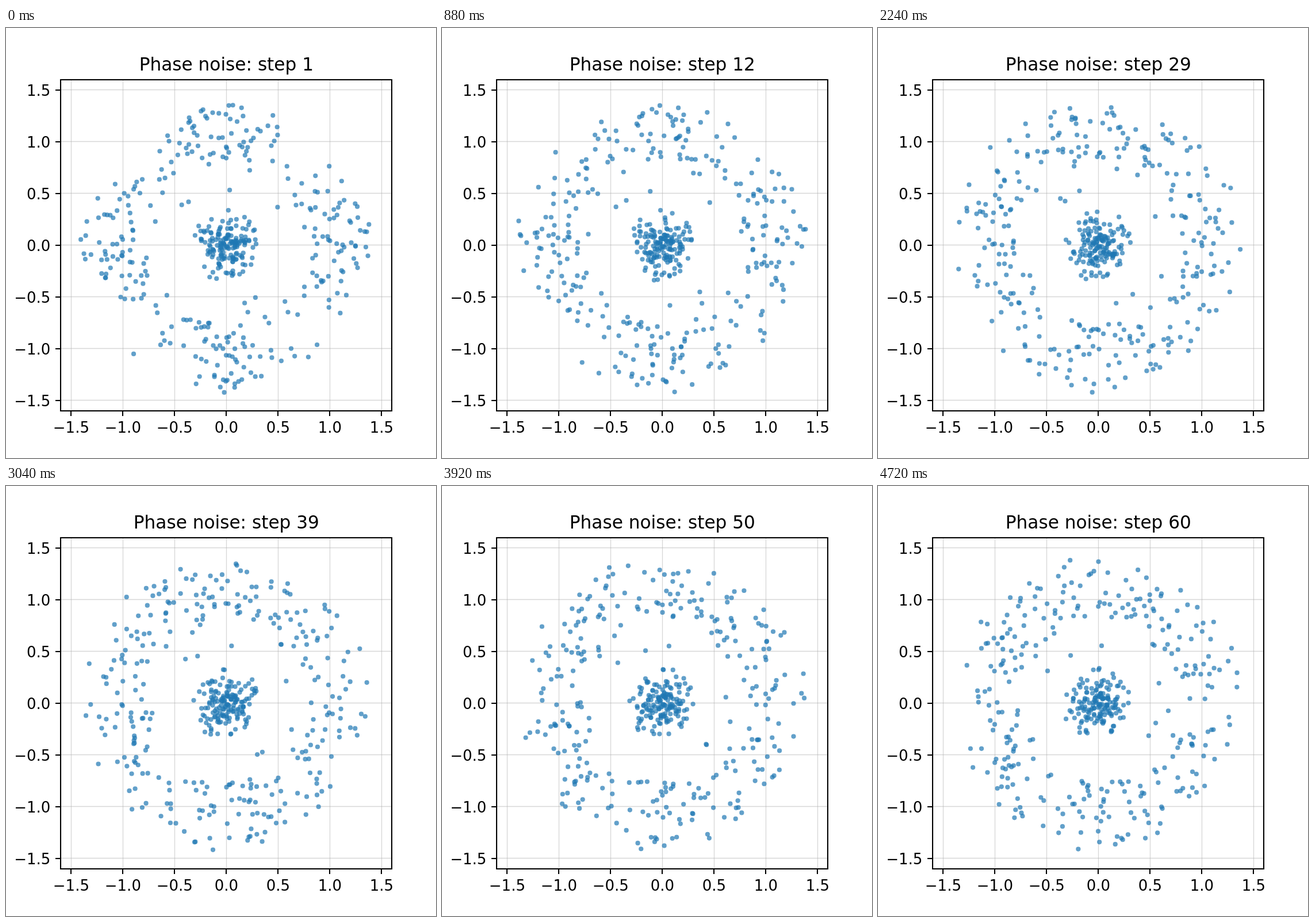
An HTML page with a canvas for the animation above (4.8 s loop, 748 px wide and 748 px high).

```html
<!DOCTYPE html>
<html lang="en">
<head>
<meta charset="utf-8">
<title>Phase noise</title>
<style>
html, body { margin: 0; width: 100%; height: 100%; overflow: hidden; background: #fff; }
canvas { display: block; width: 748px; height: 748px; }
</style>
</head>
<body>
<canvas id="stage" width="748" height="748"></canvas>
<script>
const ctx = document.getElementById('stage').getContext('2d');
const STEPS = 60, STEP_MS = 80;
const BOX = { left: 95, top: 90, size: 576 };
const ORIGIN = { x: 383.35, y: 377.74 }, UNIT = 179.98;
const FONT = '"DejaVu Sans", sans-serif';
const SIGMA = 0.078;

let seed = 20417;
function random() {
  seed = (seed + 0x6d2b79f5) | 0;
  let v = Math.imul(seed ^ (seed >>> 15), 1 | seed);
  v = (v + Math.imul(v ^ (v >>> 7), 61 | v)) ^ v;
  return ((v ^ (v >>> 14)) >>> 0) / 4294967296;
}
const between = (a, b) => a + (b - a) * random();
const gauss = () => Math.sqrt(-2 * Math.log(1 - random())) * Math.cos(2 * Math.PI * random());
const px = x => ORIGIN.x + x * UNIT;
const py = y => ORIGIN.y - y * UNIT;

// Every point keeps its radius while its phase takes a random walk.
const points = [];
function addPoint(r, angle) {
  const phase = [angle];
  for (let s = 1; s < STEPS; s++) phase.push(phase[s - 1] + SIGMA * gauss());
  points.push({ r, phase });
}

// Draws samples until `count` of them lie between two radii.
function addCluster(count, rMin, rMax, turn, sample) {
  while (count > 0) {
    const [x, y] = sample();
    const r = Math.hypot(x, y);
    if (r < rMin || r > rMax) continue;
    addPoint(r, Math.atan2(y, x) + turn);
    count--;
  }
}

// Four wide clusters on the axes, tapering sideways into a diamond.
for (let quarter = 0; quarter < 4; quarter++) {
  addCluster(72, 0.72, 1.57, quarter * Math.PI / 2, () => {
    const y = 0.35 * gauss();
    return [between(0.82, 1.4) + 0.07 * gauss() - 0.4 * Math.abs(y), y];
  });
}

// Dense centre, with a few strays in the gap around it.
addCluster(158, 0, 0.37, 0, () => [0.14 * gauss(), 0.14 * gauss()]);
for (let n = 0; n < 7; n++) addPoint(between(0.48, 0.7), between(0, 2 * Math.PI));

function line(x1, y1, x2, y2) {
  ctx.beginPath();
  ctx.moveTo(x1, y1);
  ctx.lineTo(x2, y2);
  ctx.stroke();
}

function eachTick(draw) {
  for (let t = -1.5; t <= 1.5; t += 0.5) draw(t, Math.round(px(t)), Math.round(py(t)));
}

function drawGrid() {
  ctx.strokeStyle = 'rgba(176,176,176,0.5)';
  ctx.lineWidth = 1.3;
  eachTick((t, x, y) => {
    line(x + 0.5, BOX.top, x + 0.5, BOX.top + BOX.size);
    line(BOX.left, y - 0.5, BOX.left + BOX.size, y - 0.5);
  });
}

function drawAxes() {
  const bottom = BOX.top + BOX.size;
  ctx.strokeStyle = ctx.fillStyle = '#000';
  ctx.lineWidth = 2.08;
  ctx.strokeRect(BOX.left, BOX.top, BOX.size, BOX.size);
  ctx.font = '25.97px ' + FONT;
  eachTick((t, x, y) => {
    const label = t.toFixed(1).replace('-', '\u2212');
    line(x, bottom, x, bottom + 9);
    line(BOX.left, y, BOX.left - 9, y);
    ctx.textAlign = 'center';
    ctx.fillText(label, px(t), 703.5);
    ctx.textAlign = 'right';
    ctx.fillText(label, 77.2, y + 9.5);
  });
}

function draw(step) {
  ctx.fillStyle = '#fff';
  ctx.fillRect(0, 0, 748, 748);
  drawGrid();
  ctx.fillStyle = 'rgba(31,119,180,0.7)';
  for (const { r, phase } of points) {
    ctx.beginPath();
    ctx.arc(px(r * Math.cos(phase[step])), py(r * Math.sin(phase[step])), 4.1, 0, 2 * Math.PI);
    ctx.fill();
  }
  drawAxes();
  ctx.font = '31.17px ' + FONT;
  ctx.textAlign = 'center';
  ctx.fillText('Phase noise: step ' + (step + 1), ORIGIN.x, 74);
}

const start = performance.now();
function frame() {
  draw(Math.floor((performance.now() - start) / STEP_MS) % STEPS);
  requestAnimationFrame(frame);
}
frame();
</script>
</body>
</html>
```
